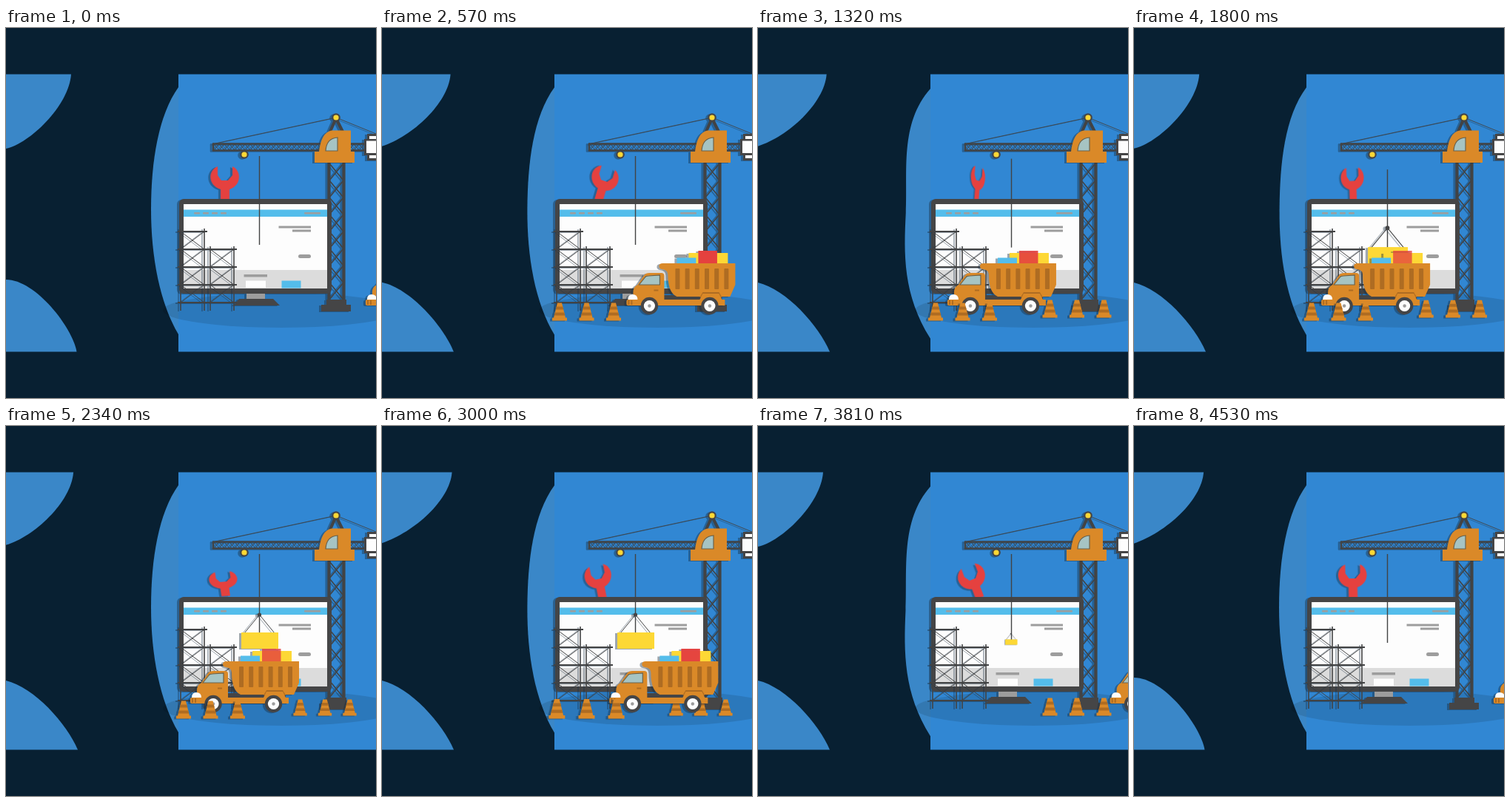
An HTML page that plays this animation: 500 px wide and 500 px high, repeating every 4560 ms.

```html
<!DOCTYPE html>
<html lang="en">
<head>
<meta charset="utf-8">
<title>Site under construction</title>
<style>
  html, body { margin: 0; width: 100%; height: 100%; overflow: hidden; background: #082032; }
  svg { display: block; width: 500px; height: 500px; }
  .shadow { filter: drop-shadow(-2.5px 1.5px .4px rgba(25, 45, 65, .42)); }
  .line { fill: none; stroke: #424344; }
  .dark { fill: #454546; }
  .orange { fill: #da8928; }
  .brown { fill: #ae6c22; }
  .red { fill: #e5413f; }
  .yellow { fill: #fdd835; }
  .sky { fill: #54bdeb; }
  .grey { fill: #9d9d9d; }
  .pale { fill: #dcdcdc; }
  .white { fill: #fdfdfd; }
  .glass { fill: #a6c4c3; stroke: #6b624c; stroke-width: 1.2; }
</style>
</head>
<body>
<svg id="stage" viewBox="0 0 500 500"></svg>
<script>
const LOOP = 4560;
const range = (n, make) => Array.from({ length: n }, (_, i) => make(i)).join('');
const rect = (cls, x, y, w, h, r = 0) =>
  `<rect class="${cls}" x="${x}" y="${y}" width="${w}" height="${h}" rx="${r}"/>`;
const circle = (cls, x, y, r) => `<circle class="${cls}" cx="${x}" cy="${y}" r="${r}"/>`;
const path = (cls, d) => `<path class="${cls}" d="${d}"/>`;
const line = (d, width) => `<path class="line" d="${d}" stroke-width="${width}"/>`;
const group = (id, body, cls = 'shadow') => `<g id="${id}" class="${cls}">${body}</g>`;
const cross = (x, y, w, h) => `M${x} ${y}l${w} ${h}M${x + w} ${y}l${-w} ${h}`;
const pulley = (x, y) => circle('dark', x, y, 5.8) + circle('yellow', x, y, 3.6);

const tower =
  line('M436.5 182V370M456.5 182V370', 4.2) +
  line(range(8, i => cross(437, 183 + i * 23, 19, 23)), 1.6) +
  path('dark', 'M433 367H460V374H466V383H426V374H433Z');

const jib =
  line('M283 156L446 121L500 143', .9) +
  line('M279 156.5H486M279 165.5H486M280 156V166', 2.6) +
  line(range(29, i => cross(281 + i * 7, 157, 7, 8)), 1) +
  line('M438 140L446 122L455 140', 4) +
  pulley(446, 121) + pulley(322, 171) +
  path('orange', 'M417 182V167H423Q426 141 440 138.5H466V167H471V182Z') +
  path('glass', 'M432 166Q433 149 448 148V166Z') +
  rect('dark', 484, 150, 20, 22) + rect('dark', 488, 143, 16, 36) +
  rect('white', 487, 152.5, 15, 16.5) +
  rect('white', 491, 146, 12, 4) + rect('white', 491, 172, 12, 4);

const wrench = path('red', 'M286 187C272 193 273 213 290 218V233H302V218C318 213 319 193 306 187' +
  'L306 199L300 206H291L286 199Z');

const monitor =
  rect('grey', 325, 358, 25, 10) + path('dark', 'M315 366H361L370 375H308Z') +
  rect('dark', 234, 231, 206, 128, 6) +
  rect('white', 240, 238, 194, 114) + rect('pale', 240, 327, 194, 25) +
  rect('sky', 240, 245.5, 194, 9.5) +
  range(4, i => rect('grey', 254 + i * 12, 249, 8, 2.5, 1)) + rect('grey', 403, 249, 22, 2.5, 1) +
  rect('grey', 368.5, 267.5, 43.5, 3) + rect('grey', 387, 272.5, 25, 3) +
  rect('grey', 395, 306, 17, 5, 2.5) + rect('grey', 321.5, 333, 31.5, 3.5) +
  rect('white', 324, 341.5, 27, 9.5) + rect('sky', 372.5, 341.5, 26, 10);

const scaffold =
  line('M232 275H272' + range(4, i => `M232 ${299 + i * 24}H312`), 2) +
  line('M236 271V382M268 271V382M276 295V382M308 295V382', 1.6) +
  line(range(4, i => cross(236, 275 + i * 24, 32, 24)), 1) +
  line(range(3, i => cross(276, 299 + i * 24, 32, 24)), 1);

const hoist =
  line('M342.5 173V293', 1.4) +
  group('block', line('M322 280L342.5 255L363 280', 1) + circle('dark', 342.5, 255, 2.6) +
    rect('yellow', 318, 279, 50, 22));

const cones = range(3, i => `<g transform="translate(${(i - 1) * 36.5})">` +
  path('orange', 'M-3 -24H3L8 -4H10V0H-10V-4H-8Z') +
  path('brown', 'M-4.3 -19H4.3L5.3 -15H-5.3ZM-6.3 -11H6.3L7.3 -7H-7.3Z') + '</g>');

const wheel = x => circle('dark', x, 375.5, 11.7) + circle('white', x, 375.5, 7.6) +
  circle('grey', x, 375.5, 2.2);

const truck =
  rect('yellow', 339, 304, 53, 20) + rect('sky', 323, 310.5, 26, 14) +
  group('crate', rect('red', 352, 301, 25.5, 22), '') +
  rect('dark', 304, 361, 80, 7) +
  path('orange', 'M299 322Q299 318 304 318H402V347L395 363H323Q311 358 311 333Q311 327 303 326Q299 325 299 322Z') +
  range(6, i => rect('brown', 321 + i * 13.2, 325, 6, 28, 1)) +
  path('orange', 'M264 374V357Q264 350 270 347L279 334Q281 331 286 331H302Q306 331 306 335V367H388V375H264Z') +
  path('glass', 'M272 347L280 337Q281 335 285 335L300 334V347Z') +
  rect('brown', 292, 353.5, 6, 2) +
  path('brown', 'M354 364L358 357H380L384 364Z') + path('orange', 'M354 367L358 359H380L384 367Z') +
  rect('orange', 255, 367, 14, 8, 2) +
  rect('brown', 257, 368, 2, 6) + rect('brown', 261, 368, 2, 6) +
  path('white', 'M257 367Q257 360 263 360Q270 360 270 367Z') +
  wheel(286) + wheel(367.5);

document.getElementById('stage').innerHTML =
  '<g fill="#3a87c8"><path id="topBlob"/><path id="lowBlob"/><path id="sideBlob"/></g>' +
  '<rect x="233" y="62.5" width="267" height="375" fill="#3187d3"/>' +
  '<ellipse cx="372" cy="381.5" rx="160" ry="23.5" fill="#0000001d"/>' +
  group('wrench', wrench) + group('tower', tower) + group('jib', jib) +
  group('monitor', monitor) + group('scaffold', scaffold) + group('hoist', hoist, '') +
  group('rightCones', cones) + group('truck', truck) + group('leftCones', cones);

const el = id => document.getElementById(id);
const transform = (id, value) => el(id).setAttribute('transform', value);
const scaleAt = (id, x, y, sx, sy = sx, angle = 0) =>
  transform(id, `translate(${x} ${y}) scale(${sx} ${sy}) rotate(${angle}) translate(${-x} ${-y})`);

const bump = (t, center, width) => Math.exp(-(((t - center) / width) ** 2));
const phase = (t, start, length) => Math.min(1, Math.max(0, (t - start) / length));
const backIn = x => 2.7 * x ** 3 - 1.7 * x ** 2;

// Grows from nothing and later shrinks away, overshooting both times
const pop = (t, start, end, length = 500) =>
  1 - backIn(1 - phase(t, start, length)) - backIn(phase(t, end, length));

// cubic-bezier(.25, .1, .25, 1), solved by bisection
function ease(x) {
  const curve = (a, b, s) => 3 * a * s * (1 - s) ** 2 + 3 * b * s * s * (1 - s) + s ** 3;
  let low = 0, high = 1;
  for (let i = 0; i < 20; i++) {
    const mid = (low + high) / 2;
    if (curve(.25, .25, mid) < x) low = mid; else high = mid;
  }
  return curve(.1, 1, low);
}

// Blends the numbers of two paths that share the same commands
function morph(id, k, from, to) {
  const goal = to.match(/[\d.]+/g);
  let i = 0;
  el(id).setAttribute('d', from.replace(/[\d.]+/g, n => +n + (goal[i++] - n) * k));
}

function draw(t) {
  const turn = 2 * Math.PI * t / LOOP;
  morph('topBlob', Math.sin(Math.PI * t / 1900) ** 2,
    'M0 62.5H88C85 105 32 156 0 163Z',
    'M0 62.5H95C92 100 45 142 0 158Z');
  morph('lowBlob', 1 - Math.cos(turn / 2) ** 30,
    'M0 437.5V340C40 340 90 405 95.5 437.5Z',
    'M0 437.5V344C38 353 82 402 97 437.5Z');
  morph('sideBlob', Math.sin(Math.PI * t / 2430) ** 6,
    'M233 80C206 118 196 180 196 245S208 372 233 414Z',
    'M233 82C190 130 203 195 200 250S195 360 233 420Z');

  const away = 1 - ease(phase(t, 0, 1450)) + ease(phase(t, 2755, 1435));
  transform('truck', `translate(${231 * away - 6 * bump(t, 2340, 500)})`);
  el('crate').setAttribute('opacity', 1 - .25 * bump(t, 2000, 700));

  const squeeze = 1 - .12 * bump(t, 2670, 550);
  transform('leftCones', `translate(276.5 395.5) scale(${pop(t, 50, 2790)})`);
  transform('rightCones', `translate(431 391.5) scale(${pop(t, 750, 3800) * squeeze})`);

  transform('hoist', `translate(0 ${28 * bump(t, 1650, 230)})`);
  scaleAt('block', 342, 293, pop(t, 1450, 3350));

  const swing = 16 * Math.sin(turn) + 7 * Math.sin(2 * turn) - 3 * (1 - Math.cos(turn));
  scaleAt('wrench', 296, 222,
    1 - .5 * bump(t, 1320, 500) - .08 * bump(t, 3300, 600), 1 - .28 * bump(t, 2340, 400), swing);
}

function tick() {
  draw(performance.now() % LOOP);
  requestAnimationFrame(tick);
}
tick();
</script>
</body>
</html>
```
